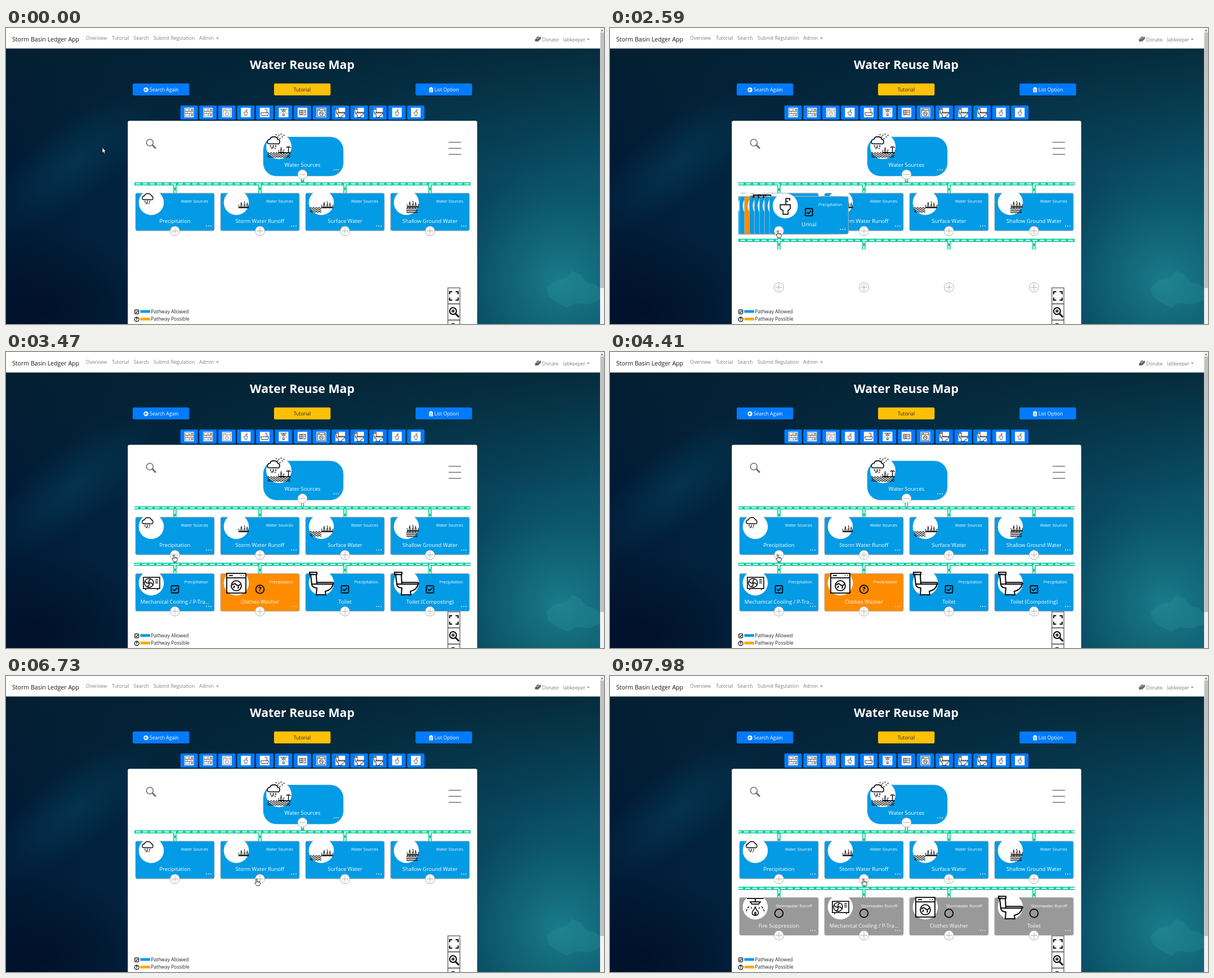
Write an HTML page that moves like this. It is 1062x527 px and loops after 8000 ms.

```html
<!DOCTYPE html>
<html lang="en">
<head>
<meta charset="utf-8">
<title>Water Reuse Map</title>
<style>
html, body { margin: 0; width: 100%; height: 100%; overflow: hidden; background: #02162f; }
svg { display: block; width: 100%; height: 100%; }
text { font-family: "Open Sans", "Noto Sans", sans-serif; white-space: pre; }
</style>
</head>
<body>
<svg id="stage" viewBox="0 0 1062 527" xmlns="http://www.w3.org/2000/svg"></svg>
<script>
const BLUE = '#039be5', ORANGE = '#ff8c00', GREY = '#999', GREEN = '#0c9', BTN = '#007bff';
const COLS = [300, 451, 602, 753], STEP = 151, ROW1 = 294, ROW2 = 394.5;
const LOOP = 8000, FLOW = 847, DASH = 8.4, GAP = 4.2;

const rect = (x, y, w, h, fill, rest = '') => `<rect x="${x}" y="${y}" width="${w}" height="${h}" fill="${fill}" ${rest}/>`;
const circ = (x, y, r, fill, rest = '') => `<circle cx="${x}" cy="${y}" r="${r}" fill="${fill}" ${rest}/>`;
const line = (d, w = 1.5, c = '#000', rest = '') => `<path d="${d}" fill="none" stroke="${c}" stroke-width="${w}" ${rest}/>`;
const text = (s, x, y, size, fill, anchor = 'start', weight = 400) =>
  `<text x="${x}" y="${y}" font-size="${size}" fill="${fill}" text-anchor="${anchor}" font-weight="${weight}">${s}</text>`;
const at = (x, y, s, k = 1) => `<g transform="translate(${x} ${y}) scale(${k})">${s}</g>`;
const ring = (x, y, r, w, c = '#000') => circ(x, y, r, 'none', `stroke="${c}" stroke-width="${w}"`);
const box = (x, y, w, h, sw, c = '#000', rest = '') => rect(x, y, w, h, 'none', `stroke="${c}" stroke-width="${sw}" ${rest}`);

function grass(x, y, n) {
  let d = '';
  for (let i = 0; i < n; i++) {
    const h = 5 + i * 5 % 7;
    d += `M${x + i * 2.6} ${y}q.3 ${-h / 2} ${i % 2 ? 1.6 : -1} ${-h}`;
  }
  return line(d, 1) + line(`M${x - 1} ${y}h${n * 2.6}`, 2);
}

function waves(x, y, w, rows) {
  let d = '';
  for (let r = 0; r < rows; r++) {
    d += `M${x} ${y + r * 3.2}q1.25-1.6 2.5 0` + 't2.5 0'.repeat(w / 2.5 - 1);
  }
  return line(d, 1.2);
}

const cloud = line('M-12-5q-5 0-4-4q1-3 4-3q1-4 6-4t6 4q3 0 3 4t-4 3z', 1.4) +
  line('M-11-3v3M-7-3v5M-3-3v3M-9 0v3M-4 1v2', 1.2);

const icons = {
  rain: cloud,
  storm: grass(5, 9, 7),
  surface: waves(-20, 10, 20, 3) + grass(1, 9, 8),
  ground: grass(2, 8, 8) + waves(0, 11, 22, 3),
  all: at(-2, 1, cloud, 1.15) +
    line('M-6-21h2M-1-20h2M3-22h2M-3-17h2M5-17h2M1-14h2M8-20h2', 1.6) +
    grass(0, 11, 4) + line('M17 11v-9M13 2q4-3 4 0q0-3 4 0', 1.4) + waves(-20, 12, 40, 3) + line('M0 11h21', 1.5),
  brick: box(-18, -17, 36, 11, 2, '#666') + box(-18, -6, 36, 11, 2, '#666') + box(-18, 5, 36, 11, 2, '#666') +
    line('M0-17v11M-8-6v11M9-6v11M1 5v11', 2, '#666') + line('M8-12h8M8 11h8', 3, '#444'),
  dryer: box(-16, -17, 32, 34, 2, '#777') + line('M-16-8h32M-11-12h8', 2, '#777') + ring(0, 5, 8, 2, '#777') + line('M-5 5q5-5 10 0', 2, '#777'),
  urinal: line('M1-3v-10h7v4M1-8h4M-9-2h18v5q0 4-4 5v7h-9v-7q-5-1-5-5z', 1.6),
  bath: line('M-17 1h34q0 11-7 12h-20q-7-1-7-12zM10 1v-13q0-4-4-4t-4 4M-12 13v3M12 13v3', 2),
  fire: line('M-15-15h30M0-15v6M-9-9h18l-3 4h-12z', 1.8) + line('M-11-1q-5 5-5 11M11-1q5 5 5 11M-7 0v3M7 0v3', 1.3, '#000', 'stroke-dasharray="4 2"') +
    line('M0 0q-2 5-5 8q-2 7 5 7t5-7q-3-2-5-8zM0 9q-3 3 0 5q3-2 0-5z', 1.5),
  cooling: box(-14, -10, 29, 20, 1.6) + ring(-4, 0, 8, 1.4) +
    line('M-4 0q-1-6 3-6M-4 0q6-1 6 3M-4 0q1 6-3 6M-4 0q-6 1-6-3', 1.6) + line('M7-6h5M7-3h5M7 0h5M-10 10v3M11 10v3', 1.3),
  washer: box(-17, -17, 34, 35, 1.8) + line('M-17-9h34M-13-13h7M8-13h1M12-13h1', 1.8) + ring(0, 5, 9, 1.8) + line('M-7 4q3-5 7-1t7-1M-5 9l2-4M3 10l1-4', 2),
  toilet: line('M-21-19h13v4h-13zM-19-15l2 17h9l-1-17M-17 2q0 6 9 7l-1 12h17l-1-6q12-3 14-13h-29M-8-1h27q3 0 3 3', 2)
};

const kinds = 'brick brick dryer urinal bath fire cooling washer toilet toilet toilet urinal urinal'.split(' ');
const uses = ['Surface Irrigation', 'Drip Irrigation', 'Dishwasher', 'Lavatory', 'Bathtub', 'Fire Suppression',
  'Mechanical Cooling / P-Tra...', 'Clothes Washer', 'Toilet', 'Toilet (Composting)', 'Toilet (Separating)', 'Urinal (Waterless)', 'Urinal'];

const check = (s, w) => box(-s, -s, 2 * s, 2 * s, w, '#000', 'rx="1.2"') + line(`M${-s * .55} 0l${s * .4} ${s * .4}l${s * .75} ${-s * .8}`, w);
const ask = (r, w, size) => ring(0, 0, r, w) + text('?', 0, size * .36, size, '#000', 'middle', 800);
const dots = (x, y) => [0, 4, 8].map(i => circ(x + i, y, 1.1, '#c9dbe6')).join('');
const toggle = (x, y, id = '') => circ(x, y, 8.4, '#fff', 'stroke="#aeaeae"') + line(`M${x - 6} ${y}h12`, 1, '#aeaeae') +
  line(`M${x} ${y - 6}v12`, 1, '#aeaeae', id && `id="${id}"`);

// One card around its top middle point
function card(name, group, icon, fill = BLUE, mark = '') {
  return rect(-70, 0, 140, 67, fill, 'stroke="#aeaeae" rx="2.8"') + circ(-42, 16.7, 22.3, '#fff') + at(-42, 16.7, icons[icon]) +
    text(group, 59, 17, 7.2, '#fff', 'end') + text(name, 0, 53, 9.4, '#fff', 'middle') + dots(56, 58.5) + (mark && at(0, 28, mark));
}

function links(px, py, y, end) {
  const ds = [-200, ...COLS, 1250].map(x => `M${px} ${py}V${y}H${x}V${end}`).join('');
  return line(ds, 5.6, GREEN) + line(ds, 2.2, '#fff', `class="flow" stroke-dasharray="${DASH} ${GAP}"`);
}

function branch(id, px, group, style) {
  const cards = uses.map((u, i) => `<g class="kid">${card(u, group, kinds[i], ...style(i))}</g>`).join('');
  return { links: `<g id="${id}L">${links(px, 361, 378, ROW2)}</g>`, cards: `<g id="${id}C">${cards}</g>`,
    toggles: `<g id="${id}T">${COLS.map(x => toggle(x, 461.7)).join('')}</g>` };
}

const rainB = branch('a', 300, 'Precipitation', i => i === 7 ? [ORANGE, ask(7.4, 1.8, 11)] : [BLUE, check(6.4, 1.8)]);
const runB = branch('b', 451, 'Stormwater Runoff', () => [GREY, ring(0, 0, 7.4, 1.8)]);
const sources = [['Precipitation', 'rain'], ['Storm Water Runoff', 'storm'], ['Surface Water', 'surface'], ['Shallow Ground Water', 'ground']];

const stop = (o, c, a = 1) => `<stop offset="${o}" stop-color="${c}" stop-opacity="${a}"/>`;
const defs = `<defs>
<linearGradient id="sea">${stop(0, '#011a36')}${stop(.2, '#02243f')}${stop(.6, '#053750')}${stop(1, '#0a5168')}</linearGradient>
<linearGradient id="dusk" x2="0" y2="1">${stop(0, '#04202f', .75)}${stop(.45, '#04202f', 0)}</linearGradient>
<radialGradient id="glow">${stop(0, '#1d8592', .85)}${stop(.5, '#14707f', .5)}${stop(1, '#0a5168', 0)}</radialGradient>
<radialGradient id="deep">${stop(0, '#010d26', .8)}${stop(1, '#010d26', 0)}</radialGradient>
<radialGradient id="haze">${stop(0, '#064562', .5)}${stop(1, '#064562', 0)}</radialGradient>
<clipPath id="view">${rect(228, 170, 597, 310, '#000')}</clipPath></defs>`;

const sea = rect(0, 36, 1055, 491, 'url(#sea)') + rect(0, 36, 1055, 491, 'url(#dusk)') +
  '<ellipse cx="120" cy="240" rx="190" ry="70" fill="url(#haze)" transform="rotate(-38 120 240)"/>' +
  '<ellipse cx="60" cy="500" rx="230" ry="140" fill="url(#deep)"/>' +
  '<ellipse cx="985" cy="450" rx="240" ry="230" fill="url(#glow)"/>' +
  '<path d="M960 462l14-12 20-4 12-14 16 8 8 12 16 4 9 10v18l-20 8-24-2-14 8-20-10-14-10z" fill="#2b929c" opacity=".3"/>';

const caret = (x, y) => `<path d="M${x - 2.4} ${y}h4.8l-2.4 2.6z" fill="#808080"/>`;
const nav = rect(0, 0, 1055, 36.5, '#fff') + text('Storm Basin Ledger App', 11, 24, 10.6, '#1a1a1a') +
  [['Overview', 142], ['Tutorial', 188], ['Search', 226.5], ['Submit Regulation', 262], ['Admin', 343]]
    .map(([s, x]) => text(s, x, 21.3, 8.6, '#808080')).join('') + caret(375.5, 17) +
  '<path d="M939 21l3-3 2 1 6-4v4l-5 5h-5zM941 17l4-2 3 1-4 2z" fill="#666"/>' +
  text('Donate', 952, 23.5, 8.6, '#808080') + text('labkeeper', 989, 23.5, 8.6, '#808080') + caret(1034, 19) +
  rect(1055, 0, 7, 527, '#f1f1f1') + rect(1055.5, 8, 6.5, 455, '#c1c1c1') + '<path d="M1056.5 5.5h4l-2-2.5z" fill="#555"/>';

const button = (x, fill) => rect(x, 98.8, 100.4, 21.2, fill, 'rx="2.2"');
const tools = text('Water Reuse Map', 526, 72.5, 21.3, '#fff', 'middle', 700) +
  button(225, BTN) + circ(248.6, 110, 4.2, '#fff') + line('M251 110h-4.6M248.6 107.8l-2.3 2.2 2.3 2.2', 1.1, BTN) + text('Search Again', 255, 113.3, 8.6, '#fff') +
  button(476, '#ffc107') + text('Tutorial', 526, 113.3, 8.6, '#212529', 'middle') +
  button(727.3, BTN) + rect(751.5, 106.5, 6.6, 8, '#fff', 'rx=".8"') + rect(753.3, 105.3, 3, 2, '#fff') +
  line('M753 109.5h3.6M753 111.2h3.6M753 112.9h3.6', .7, BTN) + text('List Option', 760.7, 113.3, 8.6, '#fff') +
  kinds.map((k, i) => {
    const x = 309.7 + i * 33.55;
    return rect(x, 138, 31, 25, BTN, 'rx="2.2"') + rect(x + 7, 142, 17, 17, '#fff') +
      at(x + 15.5, 150.5, icons[k], k === 'urinal' ? .36 : .4);
  }).join('');

const zoom = (y, s) => rect(784.7, y, 21.4, 28.4, '#fff', 'stroke="#666" stroke-width="1.4"') + at(795.4, y + 14.4, s);
const lens = '<g stroke-linecap="round">' + ring(-1.5, -1.8, 6, 2) + line('M3 3l5 5', 3) + '</g>';
const plus = 'M-4.5-1.8h6';
const legend = (y, mark, c, s) => at(232.2, y, mark) + rect(238.5, y - 3, 17.5, 4.8, c) + text(s, 257.3, y + 2.6, 8.5, '#212529');
const overlay = ring(255.4, 204, 6, 1.7, '#757575') + line('M260 208.4l5.2 5.2', 3, '#757575', 'stroke-linecap="round"') +
  line('M786 203.5h22.3M786 214.2h22.3M786 225h22.3', 1.5, '#757575') +
  zoom(462.6, line('M-7.5-3v-4.5h4.5M3-7.5h4.5v4.5M7.5 3v4.5h-4.5M-3 7.5h-4.5v-4.5', 2)) +
  zoom(491.4, lens + line(plus + 'M-1.5-4.8v6', 1.6)) + zoom(520.2, lens + line(plus, 1.6)) +
  legend(505.3, check(3.5, 1.2), BLUE, 'Pathway Allowed') + legend(518.8, ask(3.9, 1.2, 6.5), '#ffa500', 'Pathway Possible');

const root = rect(457, 194, 142, 69.5, BLUE, 'rx="23" stroke="#4aa3cf" stroke-width=".6"') + circ(484.6, 211, 22.5, '#fff') +
  at(484.6, 211, icons.all) + text('Water Sources', 526.5, 247, 9.5, '#fff', 'middle') + dots(582.3, 252.5);

const chart = `<g clip-path="url(#view)">${links(526.5, 263, 277.5, ROW1)}${rainB.links}${runB.links}${root}` +
  sources.map(([s, k], i) => at(COLS[i], ROW1, card(s, 'Water Sources', k))).join('') + rainB.cards + runB.cards +
  circ(526.5, 260.8, 8.4, '#fff', 'stroke="#aeaeae"') + line('M520.5 260.8h12', 1, '#aeaeae') +
  COLS.map((x, i) => toggle(x, 361.3, 'bar' + i)).join('') + rainB.toggles + runB.toggles + '</g>';

const ink = 'fill="#fff" stroke="#111" stroke-width=".8" stroke-linejoin="round"';
const pointer = `<g id="mouse"><path id="arrow" d="M0 0v9.4l2.1-1.9 1.6 3.6 1.6-.7-1.6-3.5h2.9z" ${ink}/>` +
  `<path id="hand" d="M-1 1q0-1.2 1-1.2t1 1.2v3.6q1.6-.7 2 .3q1.4-.5 1.8.4q1.5-.2 1.5 1.2v2.5l-1.2 3.5h-4.8l-3.2-4.4q-.6-1.4.6-1.4l1.3 1zM1 4.6v2M3 5v1.8M4.8 5.4v1.6" ${ink}/></g>`;

const $ = id => document.getElementById(id);
$('stage').innerHTML = defs + sea + nav + tools + rect(216.3, 165.3, 620.5, 380, '#fff', 'rx="3"') + chart + overlay + pointer;

const flows = [...document.querySelectorAll('.flow')];
const kids = { a: [...$('aC').children], b: [...$('bC').children] };
const path = [[0, 171, 213], [100, 171, 213], [420, 179, 236], [820, 194, 272], [1200, 228, 316], [1540, 261, 350], [1670, 270, 355],
  [2050, 290, 361], [2300, 298, 361], [5120, 298, 361], [5300, 340, 364], [5700, 392, 365], [6100, 425, 363], [6400, 445, 361],
  [6850, 445, 361], [7050, 450, 361], [LOOP, 450, 361]];

const clamp = v => Math.min(1, Math.max(0, v));
const show = (el, on) => el.setAttribute('visibility', on ? 'visible' : 'hidden');

// cubic-bezier(.25, .1, .25, 1)
function ease(p) {
  let lo = 0, hi = 1;
  for (let i = 0; i < 20; i++) {
    const u = (lo + hi) / 2, v = 1 - u;
    if (.75 * v * u * (v + u) + u * u * u < p) lo = u; else hi = u;
  }
  return .3 * lo * (1 - lo) ** 2 + 3 * lo * lo * (1 - lo) + lo ** 3;
}

function unfold(id, col, t, open, close) {
  const opened = t >= open && t < close, SLIDE = 300;
  const grow = t < close ? 1 - (1 - clamp((t - open) / SLIDE)) ** 3 : (1 - clamp((t - close) / SLIDE)) ** 3;
  show($(id + 'L'), opened);
  show($(id + 'T'), opened);
  show($('bar' + col), !opened);
  show($(id + 'C'), t >= open && t < close + SLIDE);
  kids[id].forEach((k, i) => k.setAttribute('transform',
    `translate(${COLS[col] + (i - 6) * STEP * grow} ${ROW1 + (ROW2 - ROW1) * grow})`));
}

function draw(t) {
  const p = (t - 20 + FLOW) % FLOW / FLOW;
  const shift = -ease(p) * 5 * (DASH + GAP);
  flows.forEach(f => f.setAttribute('stroke-dashoffset', shift));
  unfold('a', 0, t, 2585, 4480);
  unfold('b', 1, t, 7080, LOOP + 1);

  const i = path.findIndex(k => k[0] > t), a = path[i - 1], b = path[i];
  const f = (t - a[0]) / (b[0] - a[0]);
  const x = a[1] + (b[1] - a[1]) * f, y = a[2] + (b[2] - a[2]) * f;
  const over = COLS.some(c => Math.hypot(x - c, y - 361) < 9);
  $('mouse').setAttribute('transform', `translate(${x} ${y})`);
  show($('hand'), over);
  show($('arrow'), !over);
}

const start = performance.now();
function tick() {
  draw((performance.now() - start) % LOOP);
  requestAnimationFrame(tick);
}
tick();
</script>
</body>
</html>
```
